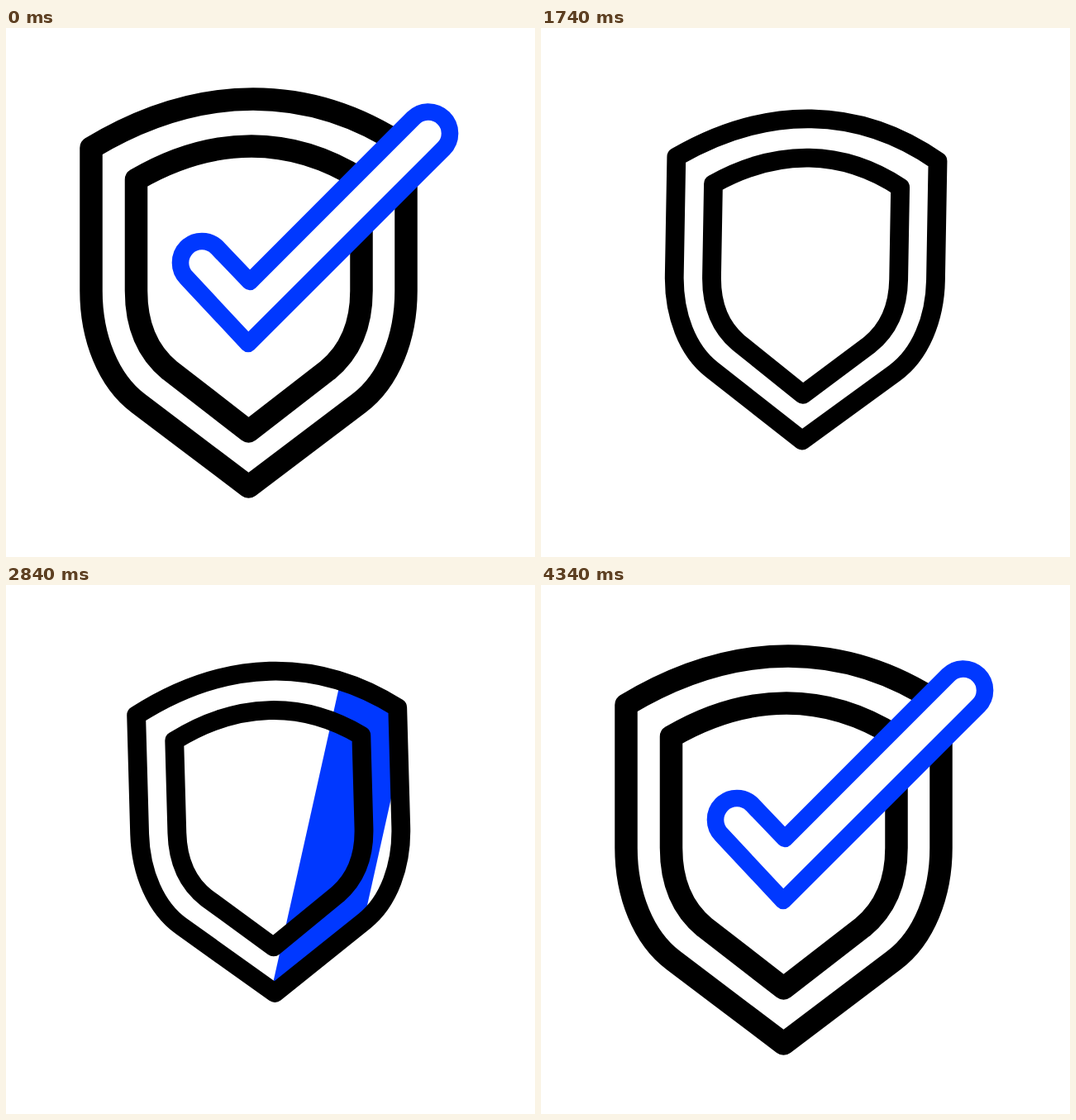
Recreate the animation shown at these times as an HTML page. Size 640 px wide and 640 px high, loop 4440 ms.

```html
<!DOCTYPE html>
<html lang="en">
<head>
<meta charset="utf-8">
<title>Shield check</title>
<style>
  html, body { margin: 0; width: 100%; height: 100%; overflow: hidden; background: #fff; }
  svg { display: block; width: 100vw; height: 100vh; }
  .line { fill: none; stroke: #000; stroke-width: 27.5; stroke-linejoin: round; }
  #check { fill: #fff; stroke: #0038ff; stroke-width: 20.6; stroke-linejoin: round; }
</style>
</head>
<body>
<svg viewBox="0 0 640 640">
  <defs>
    <path id="outer" d="M103 145Q201 86 299 86Q397 86 484 144.5V318C484 375 463 427 427 454L293.5 555L160 454C124 427 103 375 103 318Z"/>
    <path id="inner" d="M157.5 183.5Q227 143 297 143Q366 143 430 183.5V318C430 358 417 391 389 414L293.5 488L198 414C170 391 157.5 358 157.5 318Z"/>
    <clipPath id="inside"><use id="mask" href="#outer"/></clipPath>
  </defs>
  <g clip-path="url(#inside)"><path id="shine" fill="#0038ff"/></g>
  <g id="shield" class="line"><use href="#outer"/><use href="#inner"/></g>
  <path id="check"/>
</svg>
<script>
const LOOP = 4440, FULL = 4340;
const $ = id => document.getElementById(id);

// Smooth 0 to 1 between two times
function step(t, from, to) {
  const u = Math.min(1, Math.max(0, (t - from) / (to - from)));
  return u * u * (3 - 2 * u);
}

// Cubic bezier (.3, 0, .2, 1): quick start, long settle
function settle(t, from, to) {
  const x = Math.min(1, Math.max(0, (t - from) / (to - from)));
  let lo = 0, hi = 1;
  for (let n = 0; n < 24; n++) {
    const u = (lo + hi) / 2, v = 1 - u;
    if (.9 * u * v * v + .6 * u * u * v + u * u * u < x) lo = u; else hi = u;
  }
  return lo * lo * (3 - 2 * lo);
}

// Shrink and lift, dip while turning, swing back, grow again
function drawShield(t) {
  const lift = settle(t, 0, 1200);
  const dip = step(t, 1530, 2140);
  const back = step(t, 2140, 2740);
  const growth = step(t, 3120, 4300);
  const small = settle(t, 0, 1550) - growth;
  const turn = -2 * lift + 11 * dip - 10.6 * back + 1.6 * growth;
  const x = 293.5 + 26 * small - .15 * turn;
  const y = 320 - 31.5 * lift + 56.5 * dip - 46.5 * back + 21.5 * growth;
  const move = `translate(${x} ${y}) rotate(${turn}) scale(${1 - .17 * small}) translate(-293.5 -320)`;
  $('shield').setAttribute('transform', move);
  $('mask').setAttribute('transform', move);
}

function drawShine(t) {
  const x = 245.6 + (t - 2140) * .3014, tilt = 67, w = 93;
  $('shine').setAttribute('d', `M${x + tilt} 0L${x - tilt} 600h${-w}L${x + tilt - w} 0Z`);
}

// The stroke runs down the left arm (negative) and up the right arm (positive)
function checkPath(tail, head) {
  const k = 18.4, arc = 'A26 26 0 0 1 ';
  const lx = 294 + tail, ly = 341 + tail;
  const left = `L${lx - k} ${ly + k}${arc}${lx + k} ${ly - k}Z`;
  if (head < 19) {
    const e = Math.max(tail, head - 19), x = 294 + e, y = 341 + e;
    return `M${x + k} ${y - k}${arc}${x - k} ${y + k}${left}`;
  }
  const x = 294 + head, y = 344.5 - head;
  return `M295 307L${x - k} ${y - k}${arc}${x + k} ${y + k}L293 382${left}`;
}

function drawCheck(t) {
  // Leaves by the same move, backwards and faster
  const u = t < 1500 ? FULL - t * 2.12 : t;
  const shown = u > 2900;
  $('check').style.display = shown ? '' : 'none';
  if (!shown) return;
  const tail = -172 + 115 * settle(u, 2987, FULL);
  const head = -172 + 389 * settle(u, 2874, FULL);
  $('check').setAttribute('d', checkPath(tail, head));
}

// The picture holds for a tenth of a second at a time
function draw(now) {
  const raw = now % LOOP;
  const t = raw < 40 ? 0 : 40 + Math.floor((raw - 40) / 100) * 100;
  drawShield(t);
  drawShine(t);
  drawCheck(t);
}

const begin = performance.now();
function tick() {
  draw(performance.now() - begin);
  requestAnimationFrame(tick);
}
tick();
</script>
</body>
</html>
```
